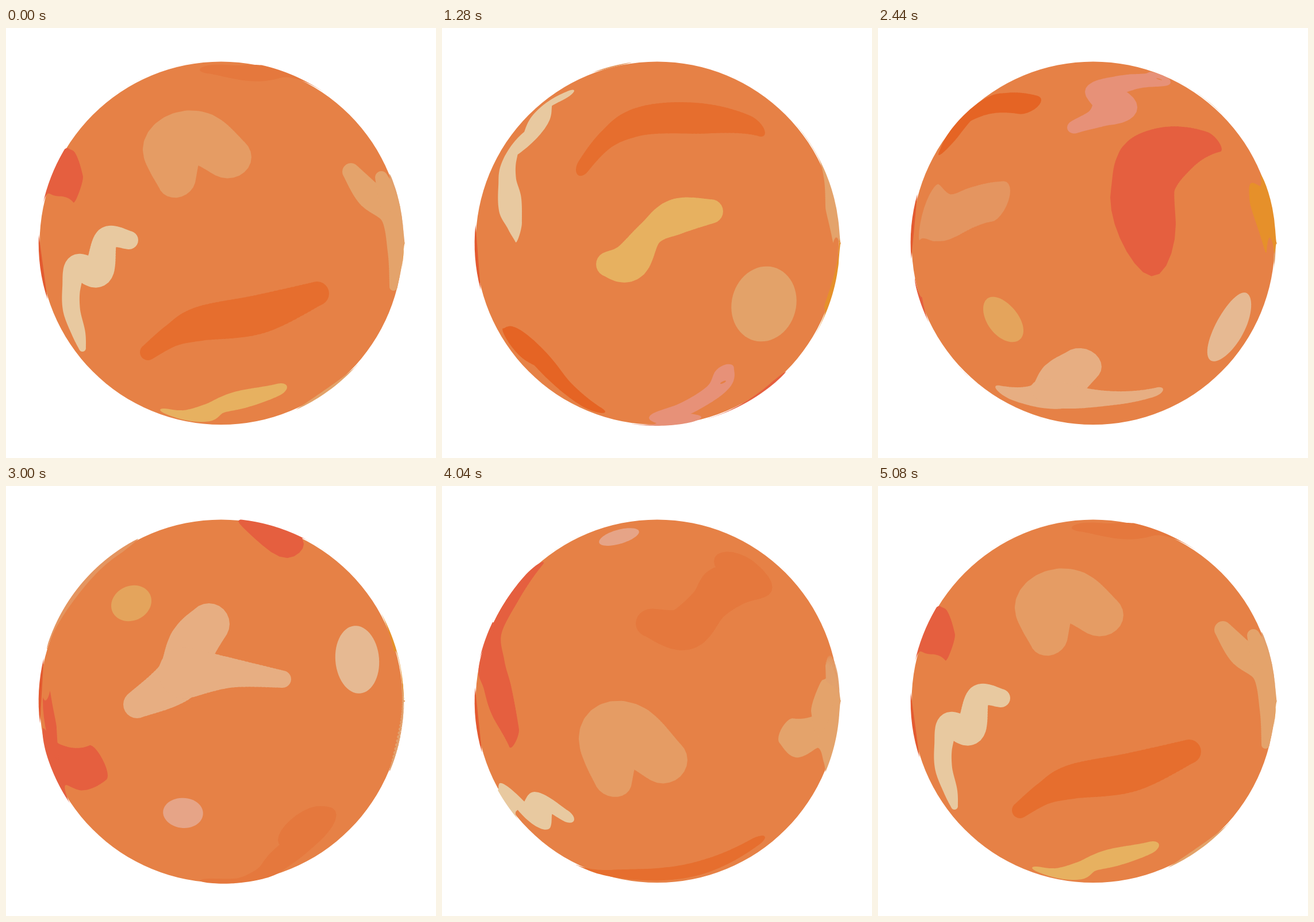
Animation, 748 px wide and 748 px high, one loop 5120 ms. Source, as an HTML page with a canvas:

```html
<!DOCTYPE html>
<html lang="en">
<head>
<meta charset="utf-8">
<title>Turning planet</title>
<style>
html, body { margin: 0; width: 100%; height: 100%; overflow: hidden; background: #fff; }
canvas { display: block; width: 100vw; height: 100vh; }
</style>
</head>
<body>
<canvas id="stage" width="748" height="748"></canvas>
<script>
const ctx = document.getElementById('stage').getContext('2d');
const LOOP = 5120, STEP = 40, SPAN = 420;
const MID = 374.3, RADIUS = 315.8, SKIN = 317.6;
const RAD = Math.PI / 180, TAU = 2 * Math.PI;
const BASE = '#e68146', RED = '#e55f3f';
const clamp = (v, lo, hi) => Math.max(lo, Math.min(hi, v));
const ring = x => Math.sqrt(Math.max(1, SKIN ** 2 - (x - MID) ** 2));

// Turn of the ball in degrees: slow start, fast middle, slow end.
function turnAt(t) {
  const u = t / (LOOP - STEP);
  return SPAN * (0.95 * u * u * (3 - 2 * u) + 0.05 * u);
}

// Ellipse outline in stage coordinates.
function ellipse(x, y, rx, ry = rx, tilt = 0, n = 24) {
  const c = Math.cos(tilt * RAD), s = Math.sin(tilt * RAD);
  return Array.from({ length: n }, (_, i) => {
    const px = rx * Math.cos(i / n * TAU), py = ry * Math.sin(i / n * TAU);
    return [x + px * c - py * s, y + px * s + py * c];
  });
}

function curve(a, b, c, d, u) {
  return 0.5 * (2 * b + (c - a) * u + (2 * a - 5 * b + 4 * c - d) * u * u
    + (3 * b - a - 3 * c + d) * u * u * u);
}

const blobs = [];

// Wraps outlines, as they look at the given time, onto the ball.
function wrap(color, time, outlines) {
  const turn = turnAt(time);
  const paths = outlines.map(o => o.map(([x, y]) =>
    [x, Math.asin(clamp((y - MID) / ring(x), -1, 1)) / RAD]));
  const angles = paths.flat().map(p => p[1]);
  const mid = (Math.min(...angles) + Math.max(...angles)) / 2;
  blobs.push({ color, at: mid + turn, paths: paths.map(p => p.map(([x, a]) => [x, a - mid])) });
}

function oval(color, time, ...shape) {
  wrap(color, time, [ellipse(...shape, 60)]);
}

// Brush stroke along a smooth spine of [x, y, radius].
function stroke(color, time, ...spine) {
  const discs = [], last = spine.length - 1, steps = 16;
  for (let i = 0; i < last; i++) {
    const near = [i - 1, i, i + 1, i + 2].map(k => spine[clamp(k, 0, last)]);
    for (let s = 0; s <= steps; s++) {
      const at = k => curve(...near.map(p => p[k]), s / steps);
      discs.push(ellipse(at(0), at(1), Math.max(1, at(2))));
    }
  }
  wrap(color, time, discs);
}

// Tan bean
stroke('#e59c64', 4440, [297, 369, 33], [292, 300, 54], [330, 285, 52], [385, 328, 42]);
// Cream ribbon
stroke('#e8c9a0', 0, [214, 369, 16], [175, 366, 20], [160, 424, 26], [124, 415, 21],
  [114, 450, 16], [114, 490, 15], [126, 530, 12], [133, 557, 6]);
// Wide dark streak
stroke('#e66e2e', 0, [541, 462, 21], [440, 498, 34], [340, 514, 30], [290, 534, 20], [247, 564, 14]);
// Yellow streak
stroke('#e7b160', 1280, [468, 319, 21], [408, 328, 31], [362, 357, 23], [326, 407, 33], [290, 411, 22]);
// Tan oval
oval('#e3a269', 1280, 560, 480, 56, 66, 15);
// Tan patches on the right edge
stroke('#e4a36b', 0, [600, 250, 15], [632, 290, 23], [672, 325, 21], [678, 390, 14], [674, 450, 7]);
stroke('#e4a36b', 0, [653, 260, 11], [668, 300, 20]);
stroke('#e2a06c', 3000, [690, 345, 2], [690, 400, 3], [670, 494, 3]);
// Orange patch on the right edge
stroke('#e6902a', 1920, [679, 358, 14], [679, 400, 14], [664, 440, 17], [661, 466, 15]);
// Pink bolt with a small gap
stroke('#e79178', 1920, [490, 284, 18], [480, 322, 24], [430, 366, 26], [393, 402, 32],
  [412, 440, 39], [385, 473, 22], [343, 493, 14]);
oval(BASE, 1920, 489, 310, 5, 3, -10);
// Red club
stroke(RED, 1920, [581, 435, 17], [515, 499, 37], [468, 555, 50], [461, 607, 57]);
// Dark hook
stroke('#e56424', 1920, [128, 361, 23], [160, 326, 36], [205, 360, 28], [260, 412, 24]);
// Tan trail
stroke('#e49560', 1920, [89, 452, 18], [113, 503, 17], [150, 537, 22], [208, 568, 22]);
// Pale three-armed patch
stroke('#e7ae82', 3000, [353, 240, 36], [325, 275, 42], [300, 335, 40], [228, 380, 24]);
stroke('#e7ae82', 3000, [310, 325, 45], [390, 325, 26], [481, 336, 15]);
// Small ovals
oval('#e4a45c', 3000, 218, 204, 36, 30, -25);
oval('#e6b992', 3000, 611, 302, 38, 59, -5);
oval('#e6a487', 3640, 308, 213, 37, 27, -30);
// Faint dark patch
stroke('#e5783d', 3640, [517, 284, 44], [532, 305, 42], [495, 340, 42], [464, 388, 33],
  [420, 443, 38], [364, 434, 27]);
// Red fork
stroke(RED, 3640, [159, 217, 18], [115, 285, 22], [84, 345, 20], [91, 415, 18],
  [104, 470, 17], [125, 534, 9]);
stroke(RED, 3640, [82, 268, 6], [78, 310, 14]);

function drawBlob({ color, at, paths }, turn) {
  const off = at - turn;
  const mid = off - SPAN * Math.round(off / SPAN);
  ctx.beginPath();
  for (const path of paths) {
    path.forEach(([x, a], i) => {
      const y = MID + ring(x) * Math.sin(clamp(mid + a, -90, 90) * RAD);
      if (i) ctx.lineTo(x, y); else ctx.moveTo(x, y);
    });
    ctx.closePath();
  }
  ctx.fillStyle = color;
  ctx.fill();
}

// Sliver around the left pole, swaying as the ball turns.
function drawPole(turn) {
  const sway = 6 + 36 * Math.cos(turn / SPAN * TAU);
  const a = Math.PI - Math.asin(sway / RADIUS);
  ctx.beginPath();
  ctx.arc(MID, MID, SKIN, a - 0.18, a + 0.18);
  ctx.fillStyle = '#e35a30';
  ctx.fill();
}

function draw(now) {
  const turn = turnAt(Math.floor(now % LOOP / STEP) * STEP);
  ctx.fillStyle = '#fff';
  ctx.fillRect(0, 0, 748, 748);
  ctx.beginPath();
  ctx.arc(MID, MID, RADIUS, 0, TAU);
  ctx.fillStyle = BASE;
  ctx.fill();
  drawPole(turn);
  for (const b of blobs) drawBlob(b, turn);
}

let start;
function tick(now) {
  start ??= now;
  draw(Math.max(0, now - start));
  requestAnimationFrame(tick);
}
draw(0);
requestAnimationFrame(tick);
</script>
</body>
</html>
```
